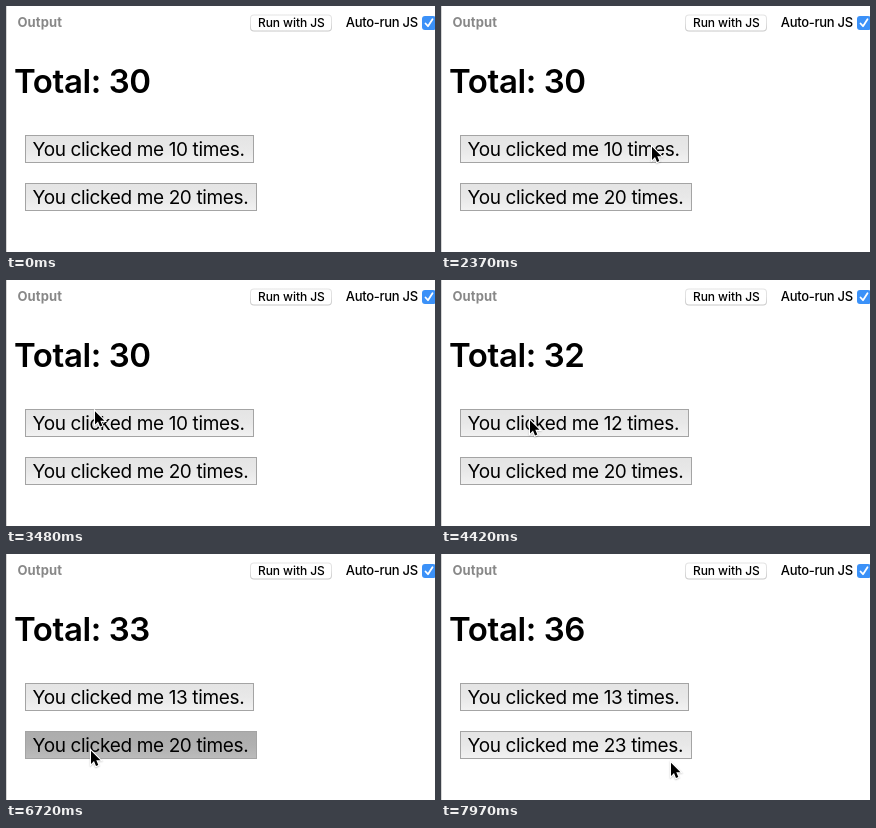
These frames come from a looping animation (429 px wide and 246 px high, 8 s). An HTML page with a canvas:

```html
<!DOCTYPE html>
<html lang="en">
<head>
<meta charset="utf-8">
<title>Click counters</title>
<style>
html, body { margin: 0; width: 100%; height: 100%; overflow: hidden; background: #fff; }
canvas { display: block; width: 429px; height: 246px; }
</style>
</head>
<body>
<canvas id="stage"></canvas>
<script>
const W = 429, H = 246, LOOP = 8000;
const canvas = document.getElementById('stage');
const ctx = canvas.getContext('2d');
const ratio = window.devicePixelRatio || 1;
canvas.width = W * ratio;
canvas.height = H * ratio;

const enter = { at: 1490, x: 320, y: 222 };

// pointer moves: start, end, x and y of the tip at the end
const moves = [
  [1490, 2260, 220, 141],
  [2320, 2370, 210, 139],
  [2490, 2880, 73, 53],
  [2880, 3100, 100, 61],
  [3150, 3480, 88, 129.5],
  [3600, 3820, 88, 138.5],
  [5490, 5600, 89, 170.5],
  [5660, 5950, 84, 202],
  [6180, 6240, 84, 195],
  [7800, 7970, 229, 207]
];

const clicks = [
  { button: 0, down: 4360, up: 4360 },
  { button: 0, down: 4360, up: 4420 },
  { button: 0, down: 5080, up: 5140 },
  { button: 1, down: 6720, up: 6840 },
  { button: 1, down: 7320, up: 7380 },
  { button: 1, down: 7680, up: 7740 }
];

const buttons = [
  { y: 129, w: 229, count: 10 },
  { y: 177, w: 232, count: 20 }
];

const ease = k => k * k * (3 - 2 * k);

function pointerAt(t) {
  let { x, y } = enter;
  for (const [start, end, toX, toY] of moves) {
    if (t < start) break;
    const k = ease(Math.min(1, (t - start) / (end - start)));
    x += (toX - x) * k;
    y += (toY - y) * k;
  }
  return [x, y];
}

function text(str, x, y, size, weight, color, spacing) {
  ctx.font = `${weight} ${size}px Inter, Roboto, sans-serif`;
  ctx.letterSpacing = spacing + 'px';
  ctx.fillStyle = color;
  ctx.fillText(str, x, y);
}

// vertical gradient with evenly spaced grey levels
function greys(y, h, ...levels) {
  const g = ctx.createLinearGradient(0, y, 0, y + h);
  levels.forEach((v, i) => g.addColorStop(i / (levels.length - 1), `rgb(${v},${v},${v})`));
  return g;
}

function roundBox(x, y, w, h, r, fill) {
  ctx.beginPath();
  ctx.roundRect(x, y, w, h, r);
  ctx.fillStyle = fill;
  ctx.fill();
}

function drawHeader() {
  text('Output', 11.5, 21, 13, 700, '#888', 0.1);
  roundBox(244, 8.5, 82, 17, 4, greys(8.5, 17, 228, 224, 200));
  roundBox(245, 9.5, 80, 15, 3, '#fff');
  text('Run with JS', 252, 21, 12, 450, '#000', -0.08);
  text('Auto-run JS', 339.7, 21, 13, 450, '#000', -0.28);
  roundBox(416, 10, 14, 14, 3, '#3b91f8');
  ctx.beginPath();
  ctx.moveTo(419.5, 17.5);
  ctx.lineTo(422, 20.2);
  ctx.lineTo(426.5, 13.2);
  ctx.strokeStyle = '#fff';
  ctx.lineWidth = 1.8;
  ctx.lineCap = ctx.lineJoin = 'round';
  ctx.stroke();
}

function drawButton({ y, w }, count, pressed) {
  ctx.fillStyle = '#a4a4a4';
  ctx.fillRect(19, y, w, 28);
  ctx.fillStyle = pressed ? greys(y, 28, 172, 176, 188) : greys(y, 28, 228, 232, 242);
  ctx.fillRect(20, y + 1, w - 2, 26);
  text(`You clicked me ${count} times.`, 26.6, y + 21, 19, 400, '#000', -0.36);
}

function drawPointer(x, y) {
  ctx.save();
  ctx.translate(x + 1, y + 1.7);
  const arrow = new Path2D('M0 0V13.2L3 10.4L5 15.3L7.3 14.3L5.3 9.6H9.5Z');
  ctx.shadowColor = 'rgba(0,0,0,.25)';
  ctx.shadowBlur = 1.5 * ratio;
  ctx.shadowOffsetY = 0.7 * ratio;
  ctx.strokeStyle = '#fff';
  ctx.lineWidth = 2.2;
  ctx.lineJoin = 'miter';
  ctx.stroke(arrow);
  ctx.shadowColor = 'transparent';
  ctx.fillStyle = '#000';
  ctx.fill(arrow);
  ctx.restore();
}

function draw(t) {
  ctx.setTransform(ratio, 0, 0, ratio, 0, 0);
  ctx.fillStyle = '#fff';
  ctx.fillRect(0, 0, W, H);
  ctx.fillStyle = '#d6d6d6';
  ctx.fillRect(0, 0, 1, H);
  drawHeader();

  let total = 0;
  buttons.forEach((button, i) => {
    const own = clicks.filter(c => c.button === i);
    const count = button.count + own.filter(c => c.up <= t).length;
    drawButton(button, count, own.some(c => c.down <= t && t < c.up));
    total += count;
  });
  text(`Total: ${total}`, 8, 86.5, 33, 600, '#000', -0.4);

  if (t >= enter.at) drawPointer(...pointerAt(t));
}

const start = performance.now();
function tick(now) {
  draw(Math.max(0, now - start) % LOOP);
  requestAnimationFrame(tick);
}
draw(0);
requestAnimationFrame(tick);
</script>
</body>
</html>
```
